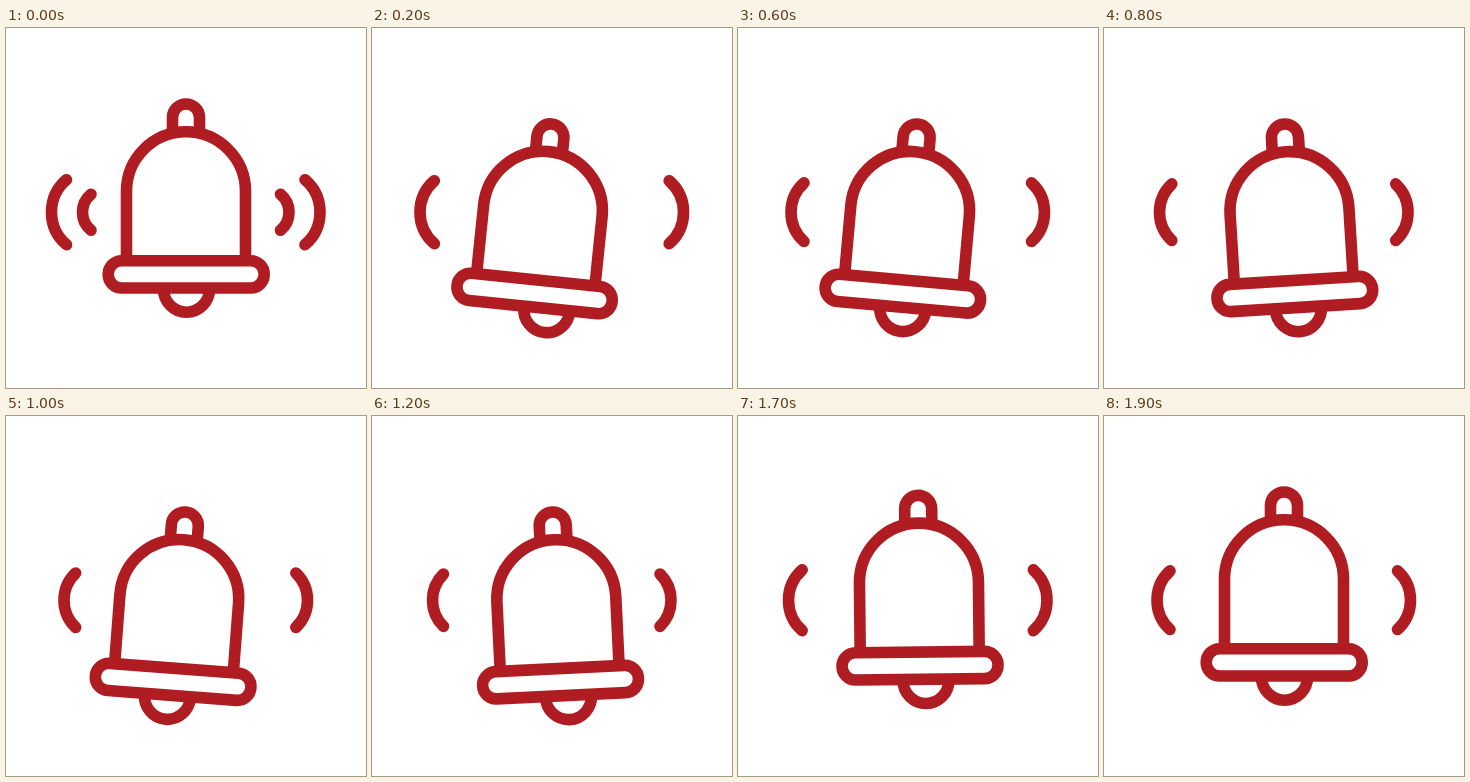
Write an HTML page that moves like this. It is 360 px wide and 360 px high and loops after 2000 ms.

```html
<!DOCTYPE html>
<html lang="en">
<head>
<meta charset="utf-8">
<title>Ringing bell</title>
<style>
  html, body { margin: 0; width: 100%; height: 100%; overflow: hidden; background: #fff; }
  svg { display: block; width: 100%; height: 100%; }
  .ink { fill: none; stroke: #af1c22; stroke-width: 11.6; }
  .wave { stroke-linecap: round; }
</style>
</head>
<body>
<svg viewBox="0 0 360 360">
  <g class="ink">
    <g id="bell">
      <path id="clapper" d="M157.5 261a23 23.2 0 0 0 46 0"/>
      <path d="M166.5 104V89.5a13.5 13.5 0 0 1 27 0V104"/>
      <path d="M120.5 230V163.3a59.5 59.5 0 0 1 119 0V230"/>
      <rect x="102.2" y="232.7" width="156" height="27.3" rx="13.5"/>
    </g>
    <path id="outer" class="wave"/>
    <path id="inner" class="wave"/>
  </g>
</svg>
<script>
const LOOP = 2000, STEP = 100, WAVE_STEPS = 13;
const [bell, clapper, outer, inner] =
  ['bell', 'clapper', 'outer', 'inner'].map(id => document.getElementById(id));

// Rises over `attack` steps, holds at 1, falls to 0 over `release` steps
const envelope = (k, attack, release, end) =>
  Math.max(0, Math.min(1, k / attack, (end - k) / release));

// Pose of the bell at step k; the swing slows down once it starts to settle
function pose(k) {
  const turns = k < 12 ? k / 4 : 3 + (k - 12) / 6;
  const swing = -Math.cos(2 * Math.PI * turns);
  const fade = envelope(k, 2, 2, 19);
  return {
    drop: 20 * envelope(k, 2, 6, 18),
    tilt: fade * (0.6 + (5.65 - 0.19 * k) * swing),
    lag: fade * (21.4 - 11.4 * Math.log(k || 1)) * swing,
  };
}

// Mirrored pair of arcs: x of the crest, x of the tips, half height
function arcs(crest, tip, half) {
  const sag = tip - crest, r = (half * half + sag * sag) / (2 * sag);
  const side = (x, sweep) =>
    `M${x} ${184.2 - half}A${r} ${r} 0 0 ${sweep} ${x} ${184.2 + half}`;
  return side(tip, 0) + side(359.5 - tip, 1);
}

function draw(time) {
  const k = Math.floor(time % LOOP / STEP);
  const { drop, tilt, lag } = pose(k);
  bell.setAttribute('transform', `translate(0 ${drop}) rotate(${tilt} 180 74)`);
  clapper.setAttribute('transform', `translate(${lag} 0)`);

  const phase = k % WAVE_STEPS, p = phase / (WAVE_STEPS - 1);
  outer.setAttribute('d', arcs(45.5 + 15 * p, 60.5 + 11 * p, 32.5 - 6.3 * p));
  inner.setAttribute('visibility', phase === 0 ? 'visible' : 'hidden');
}

inner.setAttribute('d', arcs(76.5, 85, 18));
const start = performance.now();
function tick() {
  draw(performance.now() - start);
  requestAnimationFrame(tick);
}
tick();
</script>
</body>
</html>
```
